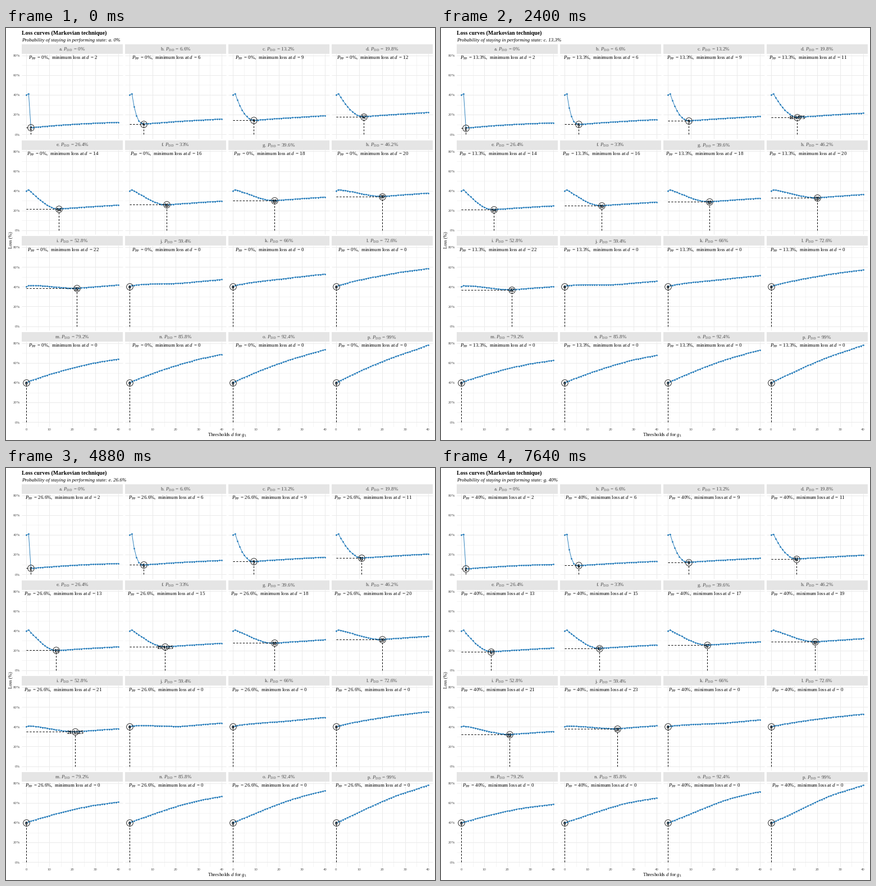
A matplotlib script for the animation above (8000 ms loop, 764x733 px).

```python
import numpy as np
import matplotlib.pyplot as plt
from matplotlib.animation import FuncAnimation
from matplotlib.collections import LineCollection
from matplotlib.patches import Rectangle

W, H, DPI = 764, 733, 100
PX = 72 / DPI
BLUE, GREY = '#1f78b8', '#4d4d4d'

plt.rcParams.update({
    'font.family': 'Liberation Serif',
    'mathtext.fontset': 'custom',
    'mathtext.rm': 'Liberation Serif',
    'mathtext.it': 'Liberation Serif:italic',
    'mathtext.bf': 'Liberation Serif:bold',
})

# Panel geometry in pixels, y pointing down
COL, ROW = 183.9, 170.7
PANEL_W, STRIP_H, PANEL_H = 180, 17, 150.6
UX, UY = 4.095, 1.756
X = np.arange(41)
PANELS = np.arange(16)
STATES = [f'{round(6.66 * s, 1):g}' for s in range(7)]
LAST = len(STATES) - 1

# Losses in the first and last state, linear between these panels
KEYS = [0, 4, 8, 12, 15]
BOTTOM = [6.8, 21.7, 38.6, 60, 73.2], [5.6, 19, 32.3, 55.4, 73]
END = [12.2, 25.6, 41.8, 64, 78.2], [10.1, 22.6, 35.3, 58.7, 78]


def mix(a, b, t):
    return np.asarray(a) * (1 - t) + np.asarray(b) * t


def curve(panel, state):
    """Losses for all thresholds, and the threshold of the lowest one."""
    w = (state / LAST) ** 1.15
    bottom = np.interp(panel, KEYS, mix(*BOTTOM, w))
    end = np.interp(panel, KEYS, mix(*END, w))
    shift = .175 * state * (1 - np.exp(-panel ** 2 / 8))
    turn = 2 + 4.202 * panel ** .754 - shift
    start = 41.2 - .5 * w

    # Cubic from d = 1 to the turn, then almost straight
    slope = 2.4 - (18.4 + 3 * w) / max(panel, 1)
    span = turn - 1
    s = np.clip((X - 1) / span, 0, 1)
    y = bottom + (start - bottom) * (1 - s) ** 2 * (1 + 2 * s)
    y += span * slope * s * (1 - s) ** 2
    y -= span * .6 * max(slope, 0) * s ** 2 * (1 - s)
    r = np.clip((X - turn) / (40 - turn), 0, 1)
    y += (end - bottom) * r * (1 + .6 / (1 + panel) * (1 - r))
    y[0] = 40
    return y, round(turn) if bottom < y[0] else 0


TABLE = [[curve(p, s) for p in PANELS] for s in range(LAST + 1)]
LOSS = np.array([[y for y, _ in row] for row in TABLE])
BEST = np.array([[d for _, d in row] for row in TABLE])
LOW = np.array([[y[d] for y, d in row] for row in TABLE])

LEFT = 28 + COL * (PANELS % 4)
TOP = 29 + ROW * (PANELS // 4)
X0 = LEFT + 2 * UX
Y0 = TOP + 160.2

fig = plt.figure(figsize=(W / DPI, H / DPI), dpi=DPI, facecolor='white')
ax = fig.add_axes([0, 0, 1, 1])
ax.set_xlim(0, W)
ax.set_ylim(H, 0)
ax.axis('off')


def label(x, y, s, size, **kw):
    kw.setdefault('va', 'baseline')
    return ax.text(x, y, s, fontsize=size * PX, zorder=6, **kw)


def prob(sub, value):
    return rf'$P_{{\mathrm{{{sub}}}}}\: =\: {value}\%$'


def grid(offset, width):
    segs = []
    for p in PANELS:
        top = TOP[p] + STRIP_H
        for v in range(offset, 81, 20):
            y = Y0[p] - v * UY
            segs.append([(LEFT[p], y), (LEFT[p] + PANEL_W, y)])
        for v in range(offset // 2, 41, 10):
            x = X0[p] + v * UX
            segs.append([(x, top), (x, top + PANEL_H)])
    ax.add_collection(LineCollection(segs, colors='#ebebeb', zorder=1,
                                     linewidths=width * PX))


grid(10, .55)
grid(0, 1.05)

label(28, 11.5, 'Loss curves (Markovian technique)', 10, weight='bold')
subtitle = label(28, 23.7, '', 9, style='italic')
label(394.5, 726, 'Thresholds $d$ for $g_1$', 8.9, ha='center')
label(8, 377.5, 'Loss (%)', 8.3, ha='center', va='center', rotation=90)

notes, tags = [], []
for p in PANELS:
    ax.add_patch(Rectangle((round(LEFT[p]), round(TOP[p])), PANEL_W, STRIP_H,
                           fc='#e5e5e5', ec='none', zorder=2))
    label(LEFT[p] + PANEL_W / 2, TOP[p] + 11.5,
          f'{chr(97 + p)}. ' + prob('DD', f'{6.6 * p:.3g}'), 9,
          ha='center', color=GREY)
    notes.append(label(X0[p] + 16 * UX, TOP[p] + 26, '', 8.9, ha='center'))
    tags.append(label(0, 0, '', 9.2, ha='center', weight='bold'))
    if p % 4 == 0:
        for v in range(0, 81, 20):
            label(25, Y0[p] - v * UY + 2.3, f'{v}%', 6.6, ha='right',
                  color=GREY)
    if p >= 12:
        for v in range(0, 41, 10):
            label(X0[p] + v * UX, 716.3, str(v), 6.8, ha='center',
                  color=GREY)

lines, = ax.plot([], [], color=BLUE, lw=.9 * PX, marker='o', ms=2.7 * PX,
                 mew=0, zorder=3)
rings, = ax.plot([], [], ls='none', marker='o', ms=11.6 * PX, mfc='none',
                 mec='black', mew=.8 * PX, zorder=5)
dashes = LineCollection([], colors='black', linewidths=PX, zorder=4,
                        linestyles=[(0, (3.2, 2.6))])
ax.add_collection(dashes)

gap = np.full((16, 1), np.nan)
line_x = np.hstack([X0[:, None] + X * UX, gap]).ravel()


def draw(frame):
    # 16 frames of change, 16 frames of rest, starting mid-rest
    step, k = divmod(max(frame - 15, 0), 32)
    part = min(k, 16) / 16
    nxt = min(step + 1, LAST)
    near = nxt if part >= .5 else step

    loss = mix(LOSS[step], LOSS[nxt], part)
    best = mix(BEST[step], BEST[nxt], part)
    low = mix(LOW[step], LOW[nxt], part)
    lines.set_data(line_x, np.hstack([Y0[:, None] - loss * UY, gap]).ravel())

    cx, cy = X0 + best * UX, Y0 - low * UY
    rings.set_data(cx, cy)
    segs = []
    for p in PANELS:
        segs.append([(cx[p], Y0[p]), (cx[p], cy[p])])
        if best[p] > 0:
            segs.append([(X0[p], cy[p]), (cx[p], cy[p])])
        tags[p].set_position((cx[p], cy[p] + 3.8))
        tags[p].set_text(f'{best[p]:g}')
        notes[p].set_text(prob('PP', STATES[near]) + ',  minimum loss at '
                          rf'$d\: =\: {BEST[near, p]}$')
    dashes.set_segments(segs)
    subtitle.set_text('Probability of staying in performing state: '
                      f'{chr(97 + near)}. {STATES[near]}%')
    return [lines, rings, dashes, subtitle, *tags, *notes]


anim = FuncAnimation(fig, draw, frames=200, interval=40, repeat=True,
                     repeat_delay=0, blit=False)
plt.show()
```
